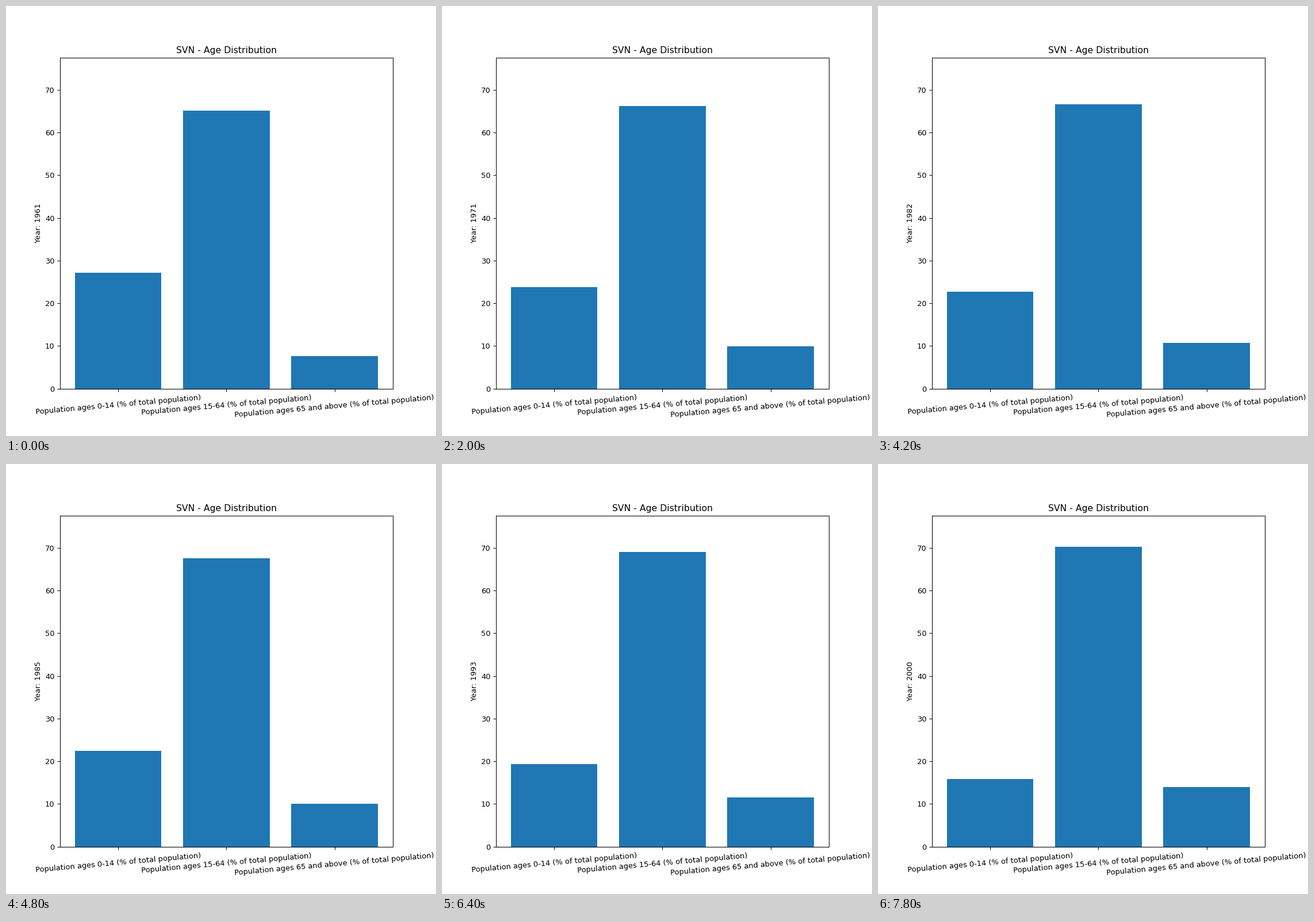
A matplotlib script that plays this animation: 748x748 px, repeating every 8 s.

```python
import matplotlib.pyplot as plt
import numpy as np
from matplotlib.animation import FuncAnimation

FIRST_YEAR = 1961
YEARS = 40
GROUPS = ["0-14", "15-64", "65 and above"]

# Turning points of the two trends in percent; the young make up the rest.
TURNS = [1961, 1967, 1971, 1979, 1985, 1989, 1993, 2000]
WORKING = [65.1, 65.5, 66.2, 65.7, 67.55, 68.45, 69.1, 70.2]
ELDERLY = [7.7, 9.1, 9.95, 11.3, 10.05, 10.45, 11.55, 13.9]


def shares(year):
    working = np.interp(year, TURNS, WORKING)
    elderly = np.interp(year, TURNS, ELDERLY)
    return 100 - working - elderly, working, elderly


fig, ax = plt.subplots(figsize=(8, 8), dpi=93.5)
bars = ax.bar(range(3), shares(FIRST_YEAR), color="#1f77b4")
ax.set_xticks(range(3), [f"Population ages {g} (% of total population)" for g in GROUPS],
              rotation=5)
ax.set_ylim(0, 77.55)
ax.set_title("SVN - Age Distribution")
label = ax.set_ylabel("")


def update(i):
    year = FIRST_YEAR + i
    for bar, height in zip(bars, shares(year)):
        bar.set_height(height)
    label.set_text(f"Year: {year}")
    return [*bars, label]


anim = FuncAnimation(fig, update, frames=YEARS, interval=200,
                     repeat=True, repeat_delay=0, blit=False)
plt.show()
```
